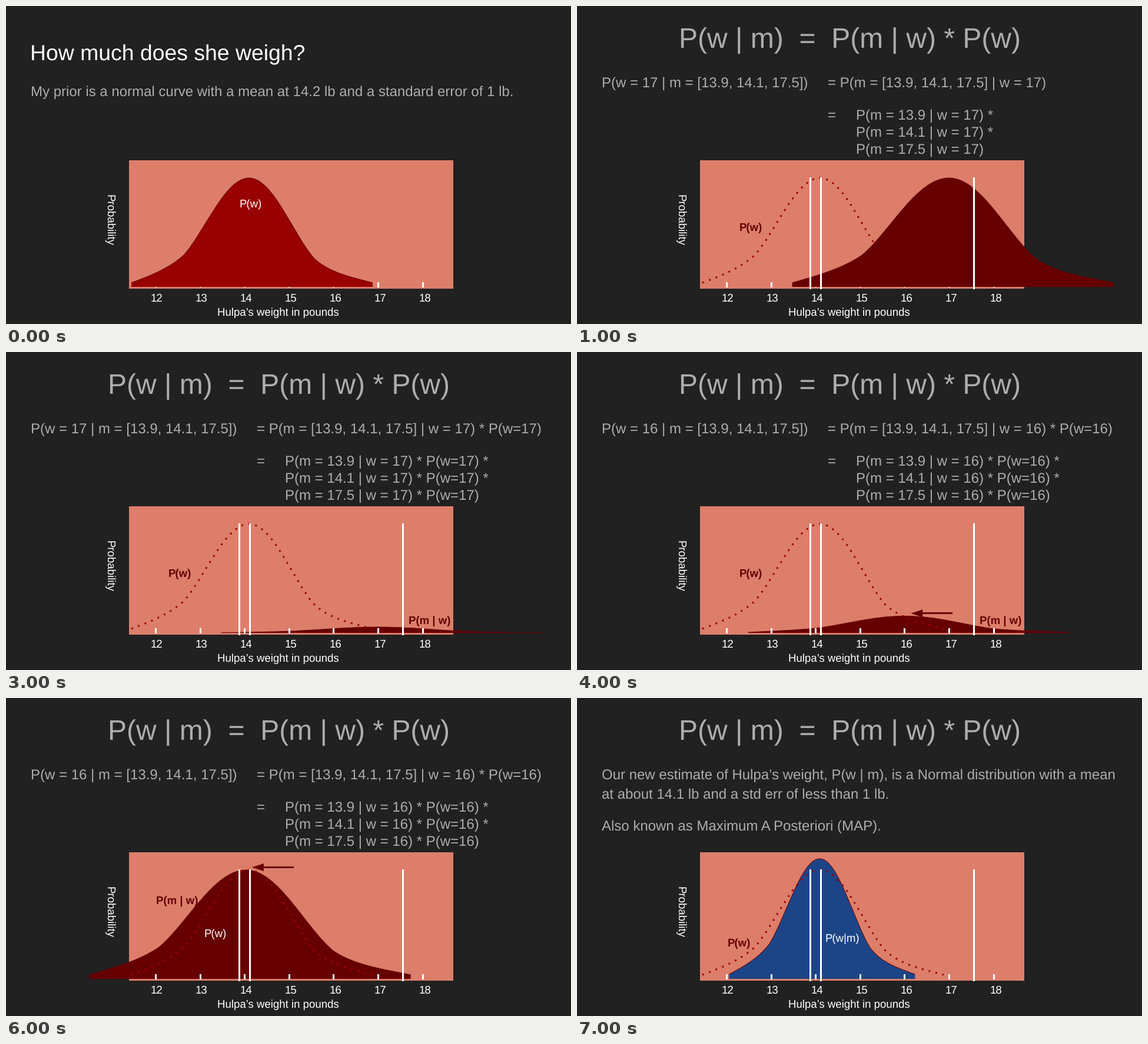
A matplotlib script for the animation above (8 s loop, 960 px wide and 540 px high).

```python
import matplotlib.pyplot as plt
from matplotlib.animation import FuncAnimation
from matplotlib.patches import PathPatch, Polygon, Rectangle
from matplotlib.path import Path

plt.rcParams["font.family"] = "Liberation Sans"
plt.rcParams["text.hinting"] = "none"

W, H, DPI = 960, 540, 100
PT = 72 / DPI  # points per pixel

BACK, PANEL, GREY = "#212121", "#dd7e6b", "#adadad"
RED, MAROON, BLUE = "#990000", "#660000", "#1c4587"

BASE, RISE = 477, 185  # foot and height of the curves
MEASURED = (396.5, 414.5, 674.5)

fig = plt.figure(figsize=(W / DPI, H / DPI), dpi=DPI, facecolor=BACK)
ax = fig.add_axes([0, 0, 1, 1])


def text(x, y, s, px=24, color=GREY, **kw):
    ax.text(x, y, s, fontsize=px * PT, color=color, zorder=2,
            va="baseline", **kw)


def label(x, y, s, color="white", **kw):
    text(x, y, s, 18.667, color, **kw)


def bold(x, y, s):
    label(x, y, s, MAROON, weight="bold")


def box(x0, y0, x1, y1, color):
    ax.add_patch(Rectangle((x0, y0), x1 - x0, y1 - y0, fc=color, lw=0, zorder=2))


def bar(x, y0, y1, color="white"):
    box(x - 1.5, y0, x + 1.5, y1, color)


def flank(side, reach, knee):
    """Bezier points from the peak outwards, as offset and height."""
    pts = [(0, RISE), (41, RISE), (75, knee + 40), (111, knee),
           (138, knee - 25), (177, 16), (reach, 7)]
    return [(side * x, h) for x, h in pts]


BELL = flank(-1, 200, 54)[:0:-1] + flank(1, 210, 48)


def bell(peak=413, spread=1.0, height=1.0):
    return [(peak + spread * x, BASE - height * h) for x, h in BELL]


def stroke(pts, color, px, dash="solid"):
    path = Path(pts, [Path.MOVETO] + [Path.CURVE4] * (len(pts) - 1))
    ax.add_patch(PathPatch(path, fill=False, ec=color, lw=px * PT, ls=dash,
                           capstyle="butt", zorder=2))


def hill(pts, color, edge=MAROON):
    verts = pts + [(pts[-1][0], BASE), (pts[0][0], BASE), pts[0]]
    codes = ([Path.MOVETO] + [Path.CURVE4] * (len(pts) - 1)
             + [Path.LINETO] * 2 + [Path.CLOSEPOLY])
    ax.add_patch(PathPatch(Path(verts, codes), fc=color, lw=0, zorder=2))
    stroke(pts, edge, 1)


def peak_at(w):
    return 632 - 74.7 * (17 - w)


def likelihood(w=17, height=1.0):
    return bell(peak_at(w), 1.332, height)


def dotted_prior():
    stroke(bell(), RED, 3, (0, (1, 3)))


def triangle(*pts):
    ax.add_patch(Polygon(pts, fc=MAROON, lw=0, zorder=2))


def arrow_left(tip, y):
    box(tip + 18, y - 1.5, tip + 71, y + 1.5, MAROON)
    triangle((tip, y), (tip + 20, y - 6.5), (tip + 20, y + 6.5))


def arrow_down(x, top, tip):
    bar(x, top, tip - 18, MAROON)
    triangle((x, tip), (x - 7, tip - 20), (x + 7, tip - 20))


def ticks():
    for i in range(7):
        bar(round(255 + 75.6 * i) - 0.5, 469, 478)


def axis_labels():
    for i in range(7):
        label(255.5 + 76.1 * i, 502, str(12 + i), ha="center")
    label(359, 526, "Hulpa’s weight in pounds")
    label(170, 320, "Probability", rotation=270, rotation_mode="anchor")


def formula(w, with_prior=True):
    prior = f" * P(w={w})" if with_prior else ""
    text(42, 138, f"P(w = {w} | m = [13.9, 14.1, 17.5])")
    text(426, 138, f"= P(m = [13.9, 14.1, 17.5] | w = {w})" + prior)
    text(426, 193, "=")
    for i, m in enumerate((13.9, 14.1, 17.5)):
        end = " *" if i < 2 else ""
        text(474, 193 + 29 * i, f"P(m = {m} | w = {w})" + prior + end)


def prior_scene():
    ticks()
    hill(bell(), RED)
    text(41, 92, "How much does she weigh?", 37.333, "white")
    text(42, 153, "My prior is a normal curve with a mean at 14.2 lb "
                  "and a standard error of 1 lb.")
    label(396, 342, "P(w)")


def full_scene():
    formula(17, with_prior=False)
    ticks()
    dotted_prior()
    hill(likelihood(), MAROON)
    bold(276, 382, "P(w)")


def squash_scene():
    formula(17)
    ticks()
    dotted_prior()
    stroke(likelihood(), MAROON, 3, (0, (4, 3)))
    hill(likelihood(17, 0.054), MAROON)
    arrow_down(633, 292, 467)
    bold(276, 382, "P(w)")


def slide_scene(w, height, tag, shown=None, arrow=True):
    formula(shown or w)
    hill(likelihood(w, height), MAROON)
    dotted_prior()
    ticks()
    if arrow:
        arrow_left(peak_at(w) + 10, BASE - RISE * height - 4.5)
    bold(*tag, "P(m | w)")
    if height < 1:
        bold(276, 382, "P(w)")
    else:
        label(336, 406, "P(w)")


def posterior_scene():
    hill(bell(412.5, 0.771, 1.103), BLUE)
    dotted_prior()
    ticks()
    text(42, 138, "Our new estimate of Hulpa’s weight, P(w | m), "
                  "is a Normal distribution with a mean")
    text(42, 171, "at about 14.1 lb and a std err of less than 1 lb.")
    text(42, 225, "Also known as Maximum A Posteriori (MAP).")
    bold(256, 422, "P(w)")
    label(421, 414, "P(w|m)")


SCENES = [
    prior_scene,
    full_scene,
    squash_scene,
    lambda: slide_scene(17, 0.054, (684, 462), arrow=False),
    lambda: slide_scene(16, 0.155, (684, 462)),
    lambda: slide_scene(15, 0.593, (590, 412)),
    lambda: slide_scene(14, 1, (255, 350), shown=16),
    posterior_scene,
]


def draw(i):
    ax.clear()
    ax.set(xlim=(0, W), ylim=(H, 0))
    ax.axis("off")
    box(209, 262, 760, 480, PANEL)
    SCENES[i]()
    if i > 0:
        text(173, 71, "P(w | m)  =  P(m | w) * P(w)", 48)
        for x in MEASURED:
            bar(x, 291, 481)
    axis_labels()
    return []


anim = FuncAnimation(fig, draw, frames=len(SCENES), init_func=lambda: draw(0),
                     interval=1000, repeat=True, repeat_delay=0, blit=False)
plt.show()
```
